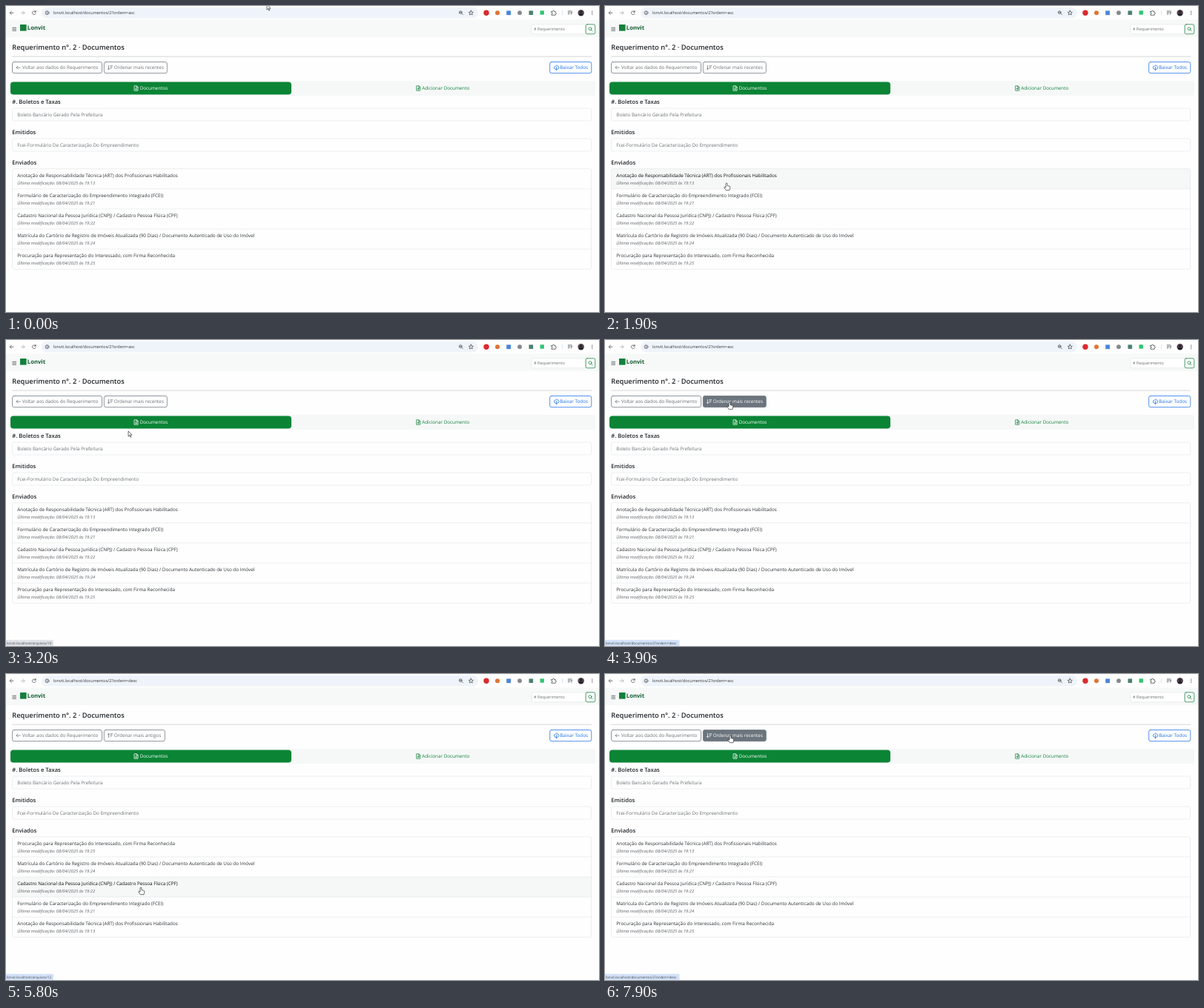
An HTML page that plays this animation: 800x413 px, repeating every 8000 ms.

```html
<!DOCTYPE html>
<html lang="pt-BR">
<head>
<meta charset="utf-8">
<title>Documentos</title>
<style>
html, body { margin: 0; width: 100%; height: 100%; overflow: hidden; background: #fefefe; }
svg { display: block; width: 100vw; height: 100vh; }
text { font: 6.32px "Open Sans", "Noto Sans", sans-serif; fill: #2b3035; text-rendering: geometricPrecision; white-space: pre; }
.title { font-size: 9.3px; font-weight: 600; fill: #212529; }
.head { font-size: 7.65px; font-weight: 600; fill: #212529; }
.muted { fill: #6a6e72; }
.date { font-size: 5.75px; font-style: italic; fill: #5f6368; }
.url { font-size: 5.55px; fill: #33363a; }
.tip { font-size: 4.7px; fill: #45494f; }
.find { font-size: 5.5px; fill: #6a6e72; }
.brand { font-size: 7.7px; font-weight: 700; fill: #145c32; }
.line { fill: none; stroke-linecap: round; stroke-linejoin: round; stroke-width: .75; }
.box { fill: none; stroke: #dfe2e4; stroke-width: .6; }
.grey { stroke: #6c757d; }
.dark { stroke: #45494e; }
.green { stroke: #15803d; }
.blue { stroke: #1b6ee8; }
</style>
</head>
<body>
<svg viewBox="0 0 800 413" preserveAspectRatio="none">
  <rect width="800" height="413" fill="#fefefe"/>

  <!-- browser bar -->
  <rect x="48" y="2" width="589" height="14.5" rx="7.2" fill="#eff3fa"/>
  <g class="line dark">
    <path d="M10 9.2H5.3M7.4 7 5.2 9.2 7.4 11.4"/>
    <path d="M20.3 9.2H25M22.9 7 25.1 9.2 22.9 11.4" stroke="#a5a9ad"/>
    <path d="M40 8A2.4 2.4 0 1 0 40.1 10.3M40.2 6.4V8.2H38.4"/>
    <circle cx="55.5" cy="9.2" r="2.4"/><path d="M55.5 9V10.4M55.5 7.8V7.9"/>
    <circle cx="613.2" cy="8.6" r="1.9"/><path d="M614.7 10.1 616.4 11.8M612.4 8.6H614"/>
    <path d="M627.3 6.1 628.2 8.2 630.4 8.4 628.7 9.9 629.2 12 627.3 10.9 625.4 12 625.9 9.9 624.2 8.4 626.4 8.2Z"/>
    <path d="M736 7.5H737.5Q737.5 6 738.6 6T739.7 7.5H741.2V9Q742.4 9 742.4 10T741.2 11V12.3H736V10.8Q737.4 10.8 737.4 9.8T736 8.8Z"/>
    <path d="M758.3 6.9H763M758.3 8.8H761M758.3 10.7H760M762.6 11.2V8.4H764"/>
    <path d="M750.5 6.3V12.2" stroke="#cddcf5"/>
  </g>
  <text class="url" id="url" x="63.8" y="11.1"></text>
  <circle cx="648" cy="9.2" r="3.7" fill="#d92b2f"/>
  <circle cx="663" cy="9.2" r="3" fill="#df7434"/>
  <rect x="675.2" y="6.4" width="5.8" height="5.8" fill="#4b86d8"/>
  <circle cx="693" cy="9.2" r="2.9" fill="#84898f"/>
  <rect x="705.5" y="6.4" width="5.6" height="5.6" fill="#4d8072"/>
  <rect x="720.5" y="6.3" width="5.4" height="5.4" fill="#2fc573"/>
  <circle cx="775.7" cy="9.2" r="4.2" fill="#50404a"/>
  <path d="M772.7 12.1Q772.8 9.9 775.7 9.9T778.7 12.1Q775.7 14.6 772.7 12.1" fill="#20212a"/>
  <circle cx="775.7" cy="8.1" r="1.6" fill="#20212a"/>
  <g fill="#45494e"><circle cx="790.8" cy="7.1" r=".65"/><circle cx="790.8" cy="9.2" r=".65"/><circle cx="790.8" cy="11.3" r=".65"/></g>

  <!-- site header -->
  <rect y="18.5" width="800" height="23.5" fill="#f6f9f8"/>
  <path class="line dark" d="M8.8 29.3H13.6M8.8 31.3H13.6M8.8 33.3H13.6"/>
  <rect x="19" y="25" width="8.6" height="8.6" fill="#14803c"/>
  <text class="brand" x="28.8" y="32.2">Lonvit</text>
  <rect class="box" x="709" y="24.8" width="73" height="13" rx="2" style="fill:#fff"/>
  <text class="find" x="712" y="33.2"># Requerimento</text>
  <rect class="line green" x="782.2" y="24.8" width="12.6" height="13" rx="2" style="fill:#fff"/>
  <g class="line green"><circle cx="788" cy="30.7" r="2"/><path d="M789.5 32.2 791.2 33.9"/></g>

  <text class="title" x="8.3" y="59">Requerimento n°. 2 · Documentos</text>
  <path d="M8.3 68.2H790" stroke="#c3c6c8" stroke-width=".7"/>

  <!-- buttons -->
  <rect class="line grey" x="8.5" y="75.5" width="121" height="15.2" rx="2.4"/>
  <path class="line grey" d="M19.2 83.1H14M16 81.1 14 83.1 16 85.1"/>
  <text class="muted" x="22" y="85.4">Voltar aos dados do Requerimento</text>
  <rect class="line grey" id="sort" x="132.3" y="75.5" height="15.2" rx="2.4"/>
  <path class="line" id="sortIcon"/>
  <text id="sortText" x="145.7" y="85.4"></text>
  <rect class="line blue" x="733.7" y="75.5" width="56.1" height="15.2" rx="2.4"/>
  <path class="line blue" d="M740.9 84.9Q739.2 84.7 739.4 83T741.1 81.4Q742 79.6 743.6 80.2T745 82Q746.3 82.5 745.9 83.8T744.2 84.9M742.5 82.6V86.5M741.2 85.3 742.5 86.6 743.8 85.3"/>
  <text x="747.2" y="85.4" style="fill:#1b6ee8">Baixar Todos</text>

  <!-- tabs -->
  <rect x="5.5" y="101" width="790" height="20" rx="3" fill="#f5f8f7"/>
  <rect x="6" y="102.6" width="379" height="16.8" rx="4" fill="#0b8435"/>
  <g class="line">
    <path id="file" stroke="#fff" d="M173.4 107.8H176.3L178 109.5V114.2H173.4ZM176.2 107.9V109.7H178M174.7 111H176.6M174.7 112.6H176.6"/>
    <path class="green" d="M554.1 107.8H557L558.7 109.5V114.2H554.1ZM556.9 107.9V109.7H558.7M555.2 111.7H557.6M556.4 110.5V112.9"/>
  </g>
  <text x="180.7" y="113.4" style="fill:#fff">Documentos</text>
  <text x="561.2" y="113.4" style="fill:#15803d">Adicionar Documento</text>

  <!-- lists -->
  <text class="head" x="8.3" y="132.4">#. Boletos e Taxas</text>
  <rect class="box" x="8.5" y="138" width="781.2" height="17" rx="2.4"/>
  <text class="muted" x="15.3" y="148.9">Boleto Bancário Gerado Pela Prefeitura</text>
  <text class="head" x="8.3" y="173.4">Emitidos</text>
  <rect class="box" x="8.5" y="179" width="781.2" height="17" rx="2.4"/>
  <text class="muted" x="15.3" y="189.9">Fcei-Formulário De Caracterização Do Empreendimento</text>
  <text class="head" x="8.3" y="214.3">Enviados</text>
  <g id="rows"></g>
  <rect class="box" x="8.5" y="219.7" width="781.2" height="135.5" rx="2.4"/>

  <g id="tip">
    <path id="tipBox"/>
    <text class="tip" id="tipText" x=".8" y="410.7"></text>
  </g>
  <path id="cursor" stroke="#222" stroke-width=".65" stroke-linejoin="round"/>
</svg>
<script>
const LOOP = 8000, TOP = 219.7, ROW = 27.1;
const host = 'lonvit.localhost/';
const $ = id => document.getElementById(id);

const docs = [
  ['Anotação de Responsabilidade Técnica (ART) dos Profissionais Habilitados', '13'],
  ['Formulário de Caracterização do Empreendimento Integrado (FCEI)', '21'],
  ['Cadastro Nacional da Pessoa Jurídica (CNPJ) / Cadastro Pessoa Física (CPF)', '22'],
  ['Matrícula do Cartório de Registro de Imóveis Atualizada (90 Dias) / Documento Autenticado de Uso do Imóvel', '24'],
  ['Procuração para Representação do Interessado, com Firma Reconhecida', '25']
];

// time, x, y of the pointer's hot spot
const path = [
  [0, 352, -2], [250, 350, 0], [1000, 162, 58], [1200, 161, 61], [1400, 162, 72],
  [1900, 164, 239], [2250, 167, 336], [2600, 165, 232], [2720, 165, 215],
  [3200, 165, 123], [3600, 168, 84], [4250, 168, 84], [4750, 180, 232],
  [5000, 183, 267], [5300, 184, 288], [5800, 182, 288], [6300, 167, 92],
  [6450, 169, 83], [8000, 169, 83]
];

const tips = [
  [0, ''], [2780, 'arquivos/10'], [3560, 'documentos/2?ordem=desc'],
  [4000, 'documentos/2?ordem=asc'], [4720, 'arquivos/14'], [5080, 'arquivos/13'],
  [5330, 'arquivos/12'], [6440, 'documentos/2?ordem=asc'], [6850, 'documentos/2?ordem=desc']
];

const shapes = {
  arrow: 'M0 0V7.2L1.7 5.6 2.8 8.2 3.8 7.7 2.7 5.2H5Z',
  hand: 'M-1 .6Q0-.6 1 .6V3.6L4 4.3Q5 4.6 4.8 6L4 9.7H-.6L-3.3 6Q-3.1 4.8-1.9 5.4L-1 6.1Z',
  beam: 'M-1.5-4Q0-4 0-3.2Q0-4 1.5-4M0-3.3V3.3M-1.5 4Q0 4 0 3.2Q0 4 1.5 4'
};

function add(parent, tag, attrs) {
  const node = document.createElementNS('http://www.w3.org/2000/svg', tag);
  for (const key in attrs) node.setAttribute(key, attrs[key]);
  return parent.appendChild(node);
}

const rows = docs.map((_, i) => {
  const y = TOP + i * ROW, g = $('rows');
  const back = add(g, 'rect', { x: 8.5, y, width: 781.2, height: ROW });
  if (i) add(g, 'path', { class: 'box', d: `M8.5 ${y}H789.7` });
  return {
    back,
    name: add(g, 'text', { x: 15.3, y: y + 11.1 }),
    date: add(g, 'text', { class: 'date', x: 15.3, y: y + 21.1 })
  };
});

function pointer(t) {
  let i = 1;
  while (path[i][0] < t) i++;
  const [t0, x0, y0] = path[i - 1], [t1, x1, y1] = path[i];
  const k = (t - t0) / (t1 - t0), e = k * k * (3 - 2 * k);
  return [x0 + (x1 - x0) * e, y0 + (y1 - y0) * e];
}

const within = (v, a, b) => v >= a && v < b;
const mix = (a, b, k) => `rgb(${a.map((v, i) => Math.round(v + (b[i] - v) * k))})`;

function draw(t) {
  const [x, y] = pointer(t);
  const desc = within(t, 4000, 6850);
  $('url').textContent = host + 'documentos/2?ordem=' + (desc ? 'desc' : 'asc');

  // sort button
  const overSort = within(y, 75.5, 91) && within(x, 132, 217);
  const ramp = s => Math.min(1, Math.max(0, s / 150));
  const fill = t < 3400 ? 0 : t < 6000 ? ramp(t - 3540) * (1 - ramp(t - 4360)) : ramp(t - 6330);
  const ink = mix([106, 112, 118], [255, 255, 255], fill);
  $('sort').setAttribute('width', desc ? 82 : 85);
  $('sort').style.fill = mix([254, 254, 254], [108, 117, 125], fill);
  $('sortText').textContent = 'Ordenar mais ' + (desc ? 'antigos' : 'recentes');
  $('sortText').style.fill = ink;
  $('sortIcon').style.stroke = ink;
  $('sortIcon').setAttribute('d', desc
    ? 'M138.5 85.7V80.5M137.2 81.8 138.5 80.5 139.8 81.8M141 80.7H143.8M141 82.5H143M141 84.3H142.2'
    : 'M138.5 80.4V85.7M137.2 84.4 138.5 85.7 139.8 84.4M141 80.7H143.8M141 82.5H143M141 84.3H142.2');

  const hot = Math.floor((y - TOP) / ROW);
  rows.forEach((row, i) => {
    const [name, minute] = docs[desc ? 4 - i : i];
    row.name.textContent = name;
    row.date.textContent = 'Última modificação: 08/04/2025 às 19:' + minute;
    row.back.setAttribute('fill', i === hot ? '#f5f8f7' : '#fefefe');
    row.name.style.fill = i === hot ? '#080a0c' : '#2b3035';
  });

  // link preview
  const [since, link] = tips.filter(s => s[0] <= t).pop();
  const wide = link.startsWith('doc');
  $('tip').style.opacity = link ? (since === 2780 ? Math.min(1, (t - since) / 120) : 1) : 0;
  $('tipText').textContent = link && host + link;
  $('tipBox').setAttribute('d', `M0 404.8H${wide ? 99 : 62.5}q1.5 0 1.5 1.5V413H0Z`);
  $('tipBox').setAttribute('fill', since === 2780 ? '#dfe2e6' : '#d3e1f8');

  const overLink = overSort || within(y, 102.6, 119.4) || within(y, 138, 155) ||
    within(y, 179, 196) || within(hot, 0, 5);
  const kind = overLink ? 'hand' : within(y, 50, 63) && x < 163 ? 'beam' : 'arrow';
  $('cursor').setAttribute('d', shapes[kind]);
  $('cursor').setAttribute('fill', kind === 'beam' ? 'none' : '#fff');
  $('cursor').setAttribute('transform', `translate(${x.toFixed(2)} ${y.toFixed(2)})`);
}

const start = performance.now();
function tick() {
  draw((performance.now() - start) % LOOP);
  requestAnimationFrame(tick);
}
tick();
</script>
</body>
</html>
```
